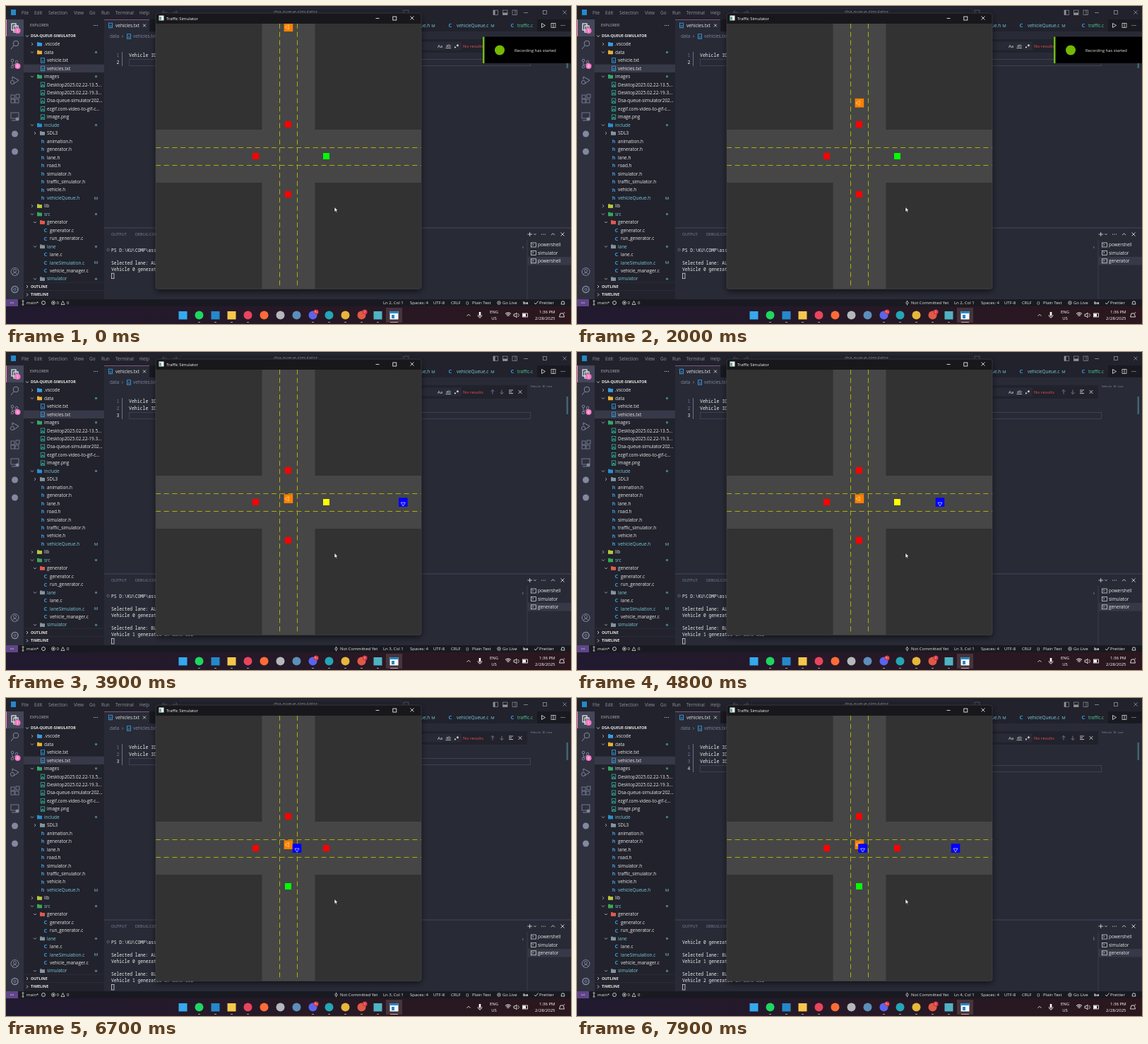
Write an HTML page with a canvas that moves like this. It is 800 by 450 pixels and loops after 8 s.

```html
<!DOCTYPE html>
<html>
<head>
<meta charset="utf-8">
<style>
html, body { margin: 0; width: 100%; height: 100%; overflow: hidden; background: #191a21; }
canvas { display: block; }
</style>
</head>
<body>
<canvas id="stage" width="800" height="450"></canvas>
<script>
const c = document.getElementById('stage').getContext('2d');
const LOOP = 8000, SPEED = 0.0537;
const UI = '"Open Sans", "Noto Sans", sans-serif', MONO = '"Noto Sans Mono", "DejaVu Sans Mono", monospace';
const FG = '#ecece6', DIM = '#8288a0', FADED = '#92939a', CYAN = '#7ccbdc', BLUE = '#3a9bdc', TEAL = '#35a08e';
const SELECTED = '#373948', YELLOW = '#acb008';

function rect(x, y, w, h, color) {
  c.fillStyle = color;
  c.fillRect(x, y, w, h);
}
function box(x, y, w, h, color, width = 0.8) {
  c.strokeStyle = color;
  c.lineWidth = width;
  c.strokeRect(x, y, w, h);
}
function disc(x, y, r, color) {
  c.fillStyle = color;
  c.beginPath();
  c.arc(x, y, r, 0, 7);
  c.fill();
}
function ring(x, y, r, color, width = 0.9) {
  c.strokeStyle = color;
  c.lineWidth = width;
  c.beginPath();
  c.arc(x, y, r, 0, 7);
  c.stroke();
}
function line(color, width, ...p) {
  c.strokeStyle = color;
  c.lineWidth = width;
  c.beginPath();
  for (let i = 0; i < p.length; i += 2) c.lineTo(p[i], p[i + 1]);
  c.stroke();
}
// y is the middle of the capitals
function text(s, x, y, color = FG, size = 6.4, font = UI, style = '') {
  c.font = `${style} ${size}px ${font}`;
  c.fillStyle = color;
  c.fillText(s, x, y + size * 0.35);
}
function centered(...args) {
  c.textAlign = 'center';
  text(...args);
  c.textAlign = 'left';
}
function cross(x, y, r, color = FG) {
  line(color, 0.8, x - r, y - r, x + r, y + r);
  line(color, 0.8, x - r, y + r, x + r, y - r);
}
function chevron(x, y, dir, color = FG, r = 2) {
  if (dir === 'right') line(color, 0.8, x - r / 2, y - r, x + r / 2, y, x - r / 2, y + r);
  else {
    const k = dir === 'down' ? 1 : -1;
    line(color, 0.8, x - r, y - k * r / 2, x, y + k * r / 2, x + r, y - k * r / 2);
  }
}
function dots(x, y, color = FG) {
  for (const d of [-2.4, 0, 2.4]) disc(x + d, y, 0.6, color);
}

function titleBar() {
  rect(0, 0, 800, 19, '#21222c');
  rect(7, 5, 7, 8, '#2489ca');
  ['File', 'Edit', 'Selection', 'View', 'Go', 'Run', 'Terminal', 'Help']
    .forEach((s, i) => text(s, [22, 40, 60, 96, 118, 135, 155, 189][i], 9.5, FADED));
  line('#5c5e6b', 0.8, 228, 9, 221, 9, 224, 6);
  line('#5c5e6b', 0.8, 236, 9, 243, 9, 240, 6);
  box(247, 3, 313, 13, '#30323f', 0.6);
  text('dsa-queue-simulator', 379, 9, FADED);
  box(563, 6, 7, 6, '#5c5e6b');
  [690, 703.5, 717].forEach((x, i) => {
    box(x, 6, 6.5, 6.5, FADED, 0.7);
    if (i === 0) rect(x, 6, 2.5, 6.5, FADED);
    if (i === 1) rect(x, 9.5, 6.5, 3, FADED);
    if (i === 2) line(FADED, 0.7, x + 4, 6, x + 4, 12.5);
  });
  line(FADED, 0.8, 733, 9.5, 739, 9.5);
  box(760.5, 6.5, 5, 5, FADED);
  cross(791, 9, 2.6, FADED);
}

function activityBar() {
  rect(0, 19, 25, 396, '#2f313f');
  rect(0, 19, 25, 24, '#44475a');
  rect(0, 19, 1, 24, '#ff79c6');
  box(8, 25, 6, 9, '#fff', 1.1);
  box(11, 28, 6, 9, '#fff', 1.1);
  ring(14, 53, 3.8, DIM, 1);
  line(DIM, 1, 11, 56, 7, 61);
  ring(9, 77, 1.8, DIM);
  ring(9, 86, 1.8, DIM);
  ring(15, 79, 1.8, DIM);
  line(DIM, 0.9, 9, 79, 9, 84);
  line(DIM, 0.9, 15, 81, 9, 84);
  for (const [y, n] of [[35, '1'], [85, '8']]) {
    disc(16.5, y, 4, '#ff79c6');
    centered(n, 16.5, y, '#fff', 5);
  }
  line(DIM, 1, 9, 104, 9, 100, 18, 105, 11, 110);
  ring(9, 108, 2.6, DIM);
  for (const [x, y] of [[7, 126], [7, 132], [13, 132], [14, 125]]) box(x, y, 5, 5, DIM);
  box(7, 151, 11, 8, DIM);
  line(DIM, 0.9, 8, 162, 14, 162);
  disc(16, 160, 2.5, DIM);
  disc(12.5, 181, 4.5, DIM);
  disc(12.5, 206, 4.5, DIM);
  ring(12.5, 376, 5.5, DIM, 1);
  ring(12.5, 374.5, 2, DIM);
  line(DIM, 0.9, 9, 380, 11, 377.5, 14, 377.5, 16, 380);
  ring(12.5, 401, 4.5, DIM, 1.5);
  ring(12.5, 401, 1.6, DIM);
}

// Prefixes: + open folder, > closed folder, then depth and name
const TREE = `>0.vscode|+0data|1vehicle.txt|1vehicles.txt|+0images|1Desktop2025.02.22-13.5...|1Desktop2025.02.22-19.3...|1Dsa-queue-simulator202...|1ezgif.com-video-to-gif-c...|1image.png|+0include|>1SDL3|1animation.h|1generator.h|1lane.h|1road.h|1simulator.h|1traffic_simulator.h|1vehicle.h|1vehicleQueue.h|>0lib|+0src|+1generator|2generator.c|2run_generator.c|+1lane|2lane.c|2laneSimulation.c|2vehicle_manager.c|+1simulator`.split('|');
const FOLDER = { '.vscode': BLUE, data: '#e8b23a', images: '#39a66b', include: '#2a8fd0', lib: '#b9c840', src: '#3ba65a', generator: '#e05a50' };
const CHANGED = ['include', 'vehicleQueue.h', 'src', 'lane', 'laneSimulation.c', 'simulator'];

function fileIcon(name, x, y) {
  if (name.endsWith('.h')) centered('h', x, y, '#3f9fe8', 7, UI, 'bold');
  else if (name.endsWith('.c')) centered('C', x, y, BLUE, 7.5, UI, 'bold');
  else if (name.endsWith('.txt')) {
    box(x - 2.5, y - 3.3, 5, 6.6, BLUE, 0.9);
    line(BLUE, 0.7, x - 1.3, y, x + 1.3, y);
    line(BLUE, 0.7, x - 1.3, y + 1.7, x + 1.3, y + 1.7);
  } else {
    box(x - 2.7, y - 3.3, 5.4, 6.6, TEAL, 0.9);
    line(TEAL, 1.2, x - 2, y + 2.5, x, y, x + 2, y + 2.5);
  }
}

function sidebar() {
  rect(25, 19, 114, 396, '#21222c');
  text('EXPLORER', 34, 27.5, '#b8b9bd', 5.5);
  dots(127, 27.5);
  chevron(30, 42.5, 'down');
  text('DSA-QUEUE-SIMULATOR', 35, 42.5, FG, 5.4, UI, 'bold');
  TREE.forEach((entry, i) => {
    const [, kind, depth, name] = entry.match(/^([+>]?)(\d)(.*)$/);
    const y = 54 + i * 11.455, d = +depth;
    const color = CHANGED.includes(name) ? CYAN : FG;
    if (name === 'vehicles.txt') rect(25, y - 5.7, 114, 11.4, SELECTED);
    if (kind) {
      const x = 37 + d * 4;
      chevron(x, y, kind === '+' ? 'down' : 'right', '#b8b9bd');
      rect(x + 7, y - 2.8, 3, 1.2, FOLDER[name] || '#8295a0');
      rect(x + 7, y - 2, 7, 4.8, FOLDER[name] || '#8295a0');
      text(name, x + 17, y, color);
    } else {
      fileIcon(name, 48 + d * 4, y);
      text(name, 54 + d * 4, y, color);
    }
    if (color === CYAN && !kind) centered('M', 127.5, y, CYAN, 6);
    else if (color === CYAN || name === 'data' || name === 'images') disc(127.5, y, 1.7, color === CYAN ? '#427d89' : '#3c8a63');
  });
  rect(25, 391, 114, 24, '#21222c');
  ['OUTLINE', 'TIMELINE'].forEach((s, i) => {
    const y = 397 + i * 11.5;
    line('#343541', 0.6, 25, y - 5.8, 139, y - 5.8);
    chevron(30, y, 'right');
    text(s, 35, y, FG, 5.4, UI, 'bold');
  });
}

function editor(rows, scrollbar) {
  rect(139, 19, 661, 295, '#282a36');
  rect(139, 19, 661, 17, '#191a21');
  rect(139, 19, 64, 17, '#282a36');
  rect(139, 19, 64, 0.8, '#9a5f8d');
  fileIcon('.txt', 148, 27.5);
  text('vehicles.txt', 155, 27.5, FG, 6.5);
  cross(196, 27.5, 2);
  rect(588, 19, 164, 17, '#21222c');
  text('ue.h', 587, 27.5, CYAN);
  centered('M', 605, 27.5, CYAN, 6);
  fileIcon('.c', 629, 27.5);
  text('vehicleQueue.c', 638, 27.5, CYAN);
  centered('M', 689, 27.5, CYAN, 6);
  fileIcon('.c', 717, 27.5);
  text('traffic.c', 724, 27.5, '#52c99a');
  rect(752, 19, 48, 17, '#191a21');
  line(FG, 0.8, 758.5, 24.5, 763.5, 27.5, 758.5, 30.5, 758.5, 24.5);
  box(772, 24.5, 6, 6, FG, 0.7);
  line(FG, 0.7, 775, 24.5, 775, 30.5);
  dots(788.5, 27.5);
  text('data', 147, 43, DIM);
  chevron(165, 43, 'right', DIM, 1.5);
  fileIcon('.txt', 174, 43);
  text('vehicles.txt', 180, 43, DIM);

  const y = 70 + rows * 10;
  box(174.5, y - 4.5, 568, 9, '#44475a', 0.8);
  line('#7e8496', 0.8, 164.5, 65, 164.5, y + 5);
  for (let i = 0; i <= rows; i++) {
    text(i + 1, 156.5, 70 + i * 10, i === rows ? FG : '#6b7699', 6.4, MONO);
    if (i < rows) text('Vehicle ID', 174, 70 + i * 10, '#f0f0ea', 6.5, MONO);
  }
  text('Vehicle ID Lane', 743, 48.5, '#8b8d98', 3.4, MONO);
  if (scrollbar) rect(793, 48, 7, 240, '#3e4050');
  rect(793.5, 63, 2.5, 25, '#3e6672');

  rect(588, 47, 150, 19, '#21222c');
  rect(588, 50.5, 57, 12, '#282a36');
  text('Aa', 611, 56.5, FG, 6);
  text('ab', 623, 55.5, FG, 5.8);
  line(FG, 0.7, 622.5, 59.5, 630, 59.5);
  rect(635, 57.5, 1.8, 1.8, FG);
  centered('*', 639.5, 56.5, FG, 7, UI, 'bold');
  text('No results', 647, 56.5, '#e65050', 6.1);
  for (const [x, k] of [[689, -1], [702, 1]]) {
    line(DIM, 0.8, x, 53.5, x, 59.5);
    line(DIM, 0.8, x - 2.4, 56.5 + k * 0.6, x, 56.5 + k * 3, x + 2.4, 56.5 + k * 0.6);
  }
  [6, 4, 6].forEach((w, i) => line(FG, 0.8, 712, 54 + i * 2.3, 712 + w, 54 + i * 2.3));
  cross(728, 56.5, 2.4);
}

function panel(count, label) {
  rect(139, 314, 661, 101, '#282a36');
  line('#5b5270', 0.7, 139, 314, 800, 314);
  text('OUTPUT', 149, 323, DIM, 5.5);
  text('DEBUG CONSOLE', 183, 323, DIM, 5.5);
  line(FG, 0.8, 738.5, 323, 745, 323);
  line(FG, 0.8, 741.7, 320, 741.7, 326);
  chevron(749, 323, 'down', FG, 1.5);
  dots(761, 323);
  chevron(774.5, 323, 'up', FG, 2.5);
  cross(788, 323, 2.5);

  const log = ['PS D:\\KU\\COMP\\assignment> ./generator', ''];
  for (let i = 0; i < count; i++) {
    const lane = i ? 'BL2' : 'AL2';
    log.push('Selected lane: ' + lane, `Vehicle ${i} generated in lane ${lane}`, '');
  }
  const first = count > 2 ? 3 : 0;
  const lineY = i => 345.6 + i * 9.1;
  log.slice(first, -1).forEach((s, i) => text(s, 149, lineY(i), '#f0f0ea', 6.25, MONO));
  if (!first) ring(144.5, 345, 1.7, '#777b8c', 0.7);
  box(149.5, lineY(log.length - 1 - first) - 3.8, 3.5, 7.5, FG, 0.7);
  rect(731, first ? 338 : 340, 1.6, first ? 5 : 3, '#565a70');

  line('#444656', 0.7, 738, 331, 738, 415);
  rect(738.5, 355, 61.5, 11.5, SELECTED);
  ['powershell', 'simulator', label].forEach((s, i) => {
    const y = 338 + i * 11.4;
    box(743.5, y - 3, 7, 6, FG, 0.7);
    chevron(746, y - 0.4, 'right', FG, 1.3);
    text(s, 753, y);
  });
}

function statusBar(row, committed) {
  rect(0, 415, 800, 10, '#191a21');
  rect(0, 415, 17, 10, '#5f4589');
  centered('><', 8.5, 420, '#f0f0ea', 5);
  ring(24, 417.5, 1, FG, 0.7);
  ring(24, 422.5, 1, FG, 0.7);
  line(FG, 0.7, 24, 418.5, 24, 421.5);
  text('main*', 29, 420, FG, 6);
  ring(53, 420, 2.5, FG, 0.8);
  ring(67, 420, 2.5, FG, 0.7);
  cross(67, 420, 1);
  text('0', 71.5, 420, FG, 6);
  line(FG, 0.7, 80.5, 417.5, 83, 422.5, 78, 422.5, 80.5, 417.5);
  text('0', 86, 420, FG, 6);
  if (committed) {
    ring(467.5, 420, 1.6, FG, 0.7);
    line(FG, 0.7, 467.5, 416.8, 467.5, 418.4);
    line(FG, 0.7, 467.5, 421.6, 467.5, 423.4);
    text('Not Committed Yet', 473, 420, FG, 6);
  }
  text(`Ln ${row}, Col 1`, 534, 420, FG, 6);
  text('Spaces: 4', 572, 420, FG, 6);
  text('UTF-8', 605, 420, FG, 6);
  text('CRLF', 630, 420, FG, 6);
  text('{}', 651, 420, FG, 5.8);
  text('Plain Text', 660, 420, FG, 6);
  ring(698, 420, 2.3, FG, 0.7);
  disc(698, 420, 0.8, FG);
  text('Go Live', 703, 420, FG, 6);
  text('ba', 732, 420, FG, 6, UI, 'bold');
  line(FG, 0.8, 748, 420, 750, 422, 753.5, 417.5);
  text('Prettier', 755, 420, FG, 6);
  line(FG, 0.8, 786, 422, 787, 418, 790, 418, 791, 422, 786, 422);
}

function taskbar() {
  const shade = c.createLinearGradient(0, 0, 800, 0);
  shade.addColorStop(0, '#211a30');
  shade.addColorStop(1, '#2b171d');
  rect(0, 425, 800, 25, shade);
  rect(538, 427, 23, 21, '#45343b');
  const apps = ['#35a9ee', '#1ed760', '#2489ca', '#f5c84b', '#e8455c', '#ff6c37', '#b5b8ba', '#5b8fb9', '#5865f2', '#23a6b5', '#e6b73c', '#e05a43', '#4fb3c4', '#f4f7fa'];
  apps.forEach((color, i) => {
    const x = 250.5 + i * 23;
    if ([0, 2, 3, 12, 13].includes(i)) rect(x - 6, 432, 12, 11.5, color);
    else disc(x, 437.5, 6, color);
    if ([1, 2, 3, 4, 8, 9, 10, 11, 12].includes(i)) rect(x - 1.5, 447, 3, 1, '#a99ca1');
  });
  rect(543.5, 432, 12, 3, '#2489ca');
  rect(546, 437, 4, 5, '#2489ca');
  rect(544, 447, 11, 1, '#e6a6bb');
  for (const x of [439, 508]) {
    disc(x, 433, 3.5, '#d83b4c');
    centered(x < 500 ? '9+' : '2', x, 433, '#fff', 4);
  }
  chevron(655, 437.5, 'up', '#fff', 2.5);
  rect(669.7, 433, 2.6, 5.5, '#fff');
  line('#fff', 0.7, 668, 437, 669, 440, 673, 440, 674, 437);
  line('#fff', 0.7, 671, 440, 671, 442);
  centered('ENG', 691, 433, '#fff', 6);
  centered('US', 691, 442, '#fff', 6);
  c.strokeStyle = '#fff';
  c.lineWidth = 1;
  for (const r of [2, 4, 6]) {
    c.beginPath();
    c.arc(711, 440, r, -2.3, -0.84);
    c.stroke();
  }
  line('#fff', 0.8, 719, 436, 721, 436, 723, 434, 723, 441, 721, 439, 719, 439, 719, 436);
  line('#fff', 0.7, 725, 435, 726.5, 437.5, 725, 440);
  box(731.5, 435, 7, 5, '#fff');
  rect(732, 435.5, 4, 4, '#fff');
  c.textAlign = 'right';
  text('1:36 PM', 777.5, 433, '#fff', 6);
  text('2/28/2025', 777.5, 442, '#fff', 6);
  c.textAlign = 'left';
  line('#fff', 0.8, 783.5, 440, 785, 435, 789, 435, 790.5, 440, 783.5, 440);
  centered('z', 790.5, 434, '#fff', 4);
}

function notice(t) {
  const x = 675 + Math.max(0, t - 3300) / 300 * 125;
  if (x >= 800) return;
  rect(x, 43.5, 125, 37.5, '#000');
  const bar = t < 3200 ? 2.5 : Math.min(22, 12 + (t - 3200) * 0.1);
  rect(x, 43.5, bar, 37.5, '#72b918');
  if (t < 3200) {
    disc(699, 62.5, 7, '#76b900');
    text('Recording has started', 720, 62.5, '#e8e8e8', 5.8);
  }
}

function dashes(...p) {
  c.setLineDash([7, 4.72]);
  line(YELLOW, 1, ...p);
  c.setLineDash([]);
}
function light(x, y, color) {
  rect(x, y, 9, 9, color);
}
function blueCar(start, t, stop) {
  const x = Math.max(stop, 594 - (t - start) * SPEED);
  if (t < start) return;
  rect(x - 6.3, 206.3, 12.6, 12.6, '#00f');
  line('#e4e4ff', 0.7, x - 3, 213, x + 3, 213, x, 218, x - 3, 213);
}

function simulator(t) {
  c.save();
  c.shadowColor = '#0009';
  c.shadowBlur = 10;
  c.shadowOffsetY = 3;
  c.fillStyle = '#17171c';
  c.beginPath();
  c.roundRect(212, 10, 376, 390.5, 3.5);
  c.fill();
  c.restore();

  c.save();
  c.beginPath();
  c.roundRect(212, 10, 376, 390.5, 3.5);
  c.clip();
  rect(216.5, 13.5, 7, 7, '#f2f2f2');
  rect(217.3, 15.3, 2.5, 4.4, '#48a878');
  text('Traffic Simulator', 227, 17.5, '#fff', 5.9);
  line('#fff', 0.8, 523.5, 17.5, 528.5, 17.5);
  box(547.8, 15, 5, 5, '#fff');
  cross(575, 17, 2.5, '#fff');

  c.beginPath();
  c.rect(212, 25, 376, 375.5);
  c.clip();
  rect(212, 25, 376, 376, '#323232');
  rect(362.5, 25, 75, 376, '#464646');
  rect(212, 175, 376, 75, '#464646');
  for (const y of [200.5, 225.5]) dashes(212, y, 588, y);
  for (const x of [387.5, 412.5]) dashes(x, 25, x, 401);

  const red = t >= 5400;
  light(395, 163, '#f00');
  light(349, 208, '#f00');
  light(449, 208, red ? '#f00' : t >= 3100 ? '#ff0' : '#0f0');
  light(395, 262, red ? '#0f0' : '#f00');

  const y = Math.min(207.7, 29.8 + t * SPEED);
  rect(393.6, y - 6.3, 12.6, 12.6, '#ff8000');
  line('#ffe0a0', 0.7, 394.8, y, 400.3, y - 3, 400.3, y + 3, 394.8, y);
  blueCar(3310, t, 404.5);
  blueCar(6820, t, 417);
  c.restore();
  c.strokeStyle = '#4a4a50';
  c.lineWidth = 0.6;
  c.beginPath();
  c.roundRect(212, 10, 376, 390.5, 3.5);
  c.stroke();
}

function pointer() {
  c.fillStyle = '#fff';
  c.strokeStyle = '#111';
  c.lineWidth = 0.6;
  c.beginPath();
  for (const [x, y] of [[0, 0], [0, 7], [1.6, 5.5], [2.8, 8], [3.9, 7.5], [2.8, 5.1], [5, 5]]) c.lineTo(465 + x, 284.5 + y);
  c.closePath();
  c.fill();
  c.stroke();
}

function draw(now) {
  const t = Math.floor(now % LOOP / 100) * 100;
  const rows = 1 + (t >= 3700) + (t >= 7200);
  const count = 1 + (t >= 3400) + (t >= 6900);
  const attached = t >= 300;
  editor(rows, attached && t < 1400);
  panel(count, attached ? 'generator' : 'powershell');
  titleBar();
  activityBar();
  sidebar();
  statusBar(rows + 1, attached);
  taskbar();
  simulator(t);
  notice(t);
  pointer();
  requestAnimationFrame(draw);
}
requestAnimationFrame(draw);
</script>
</body>
</html>
```
